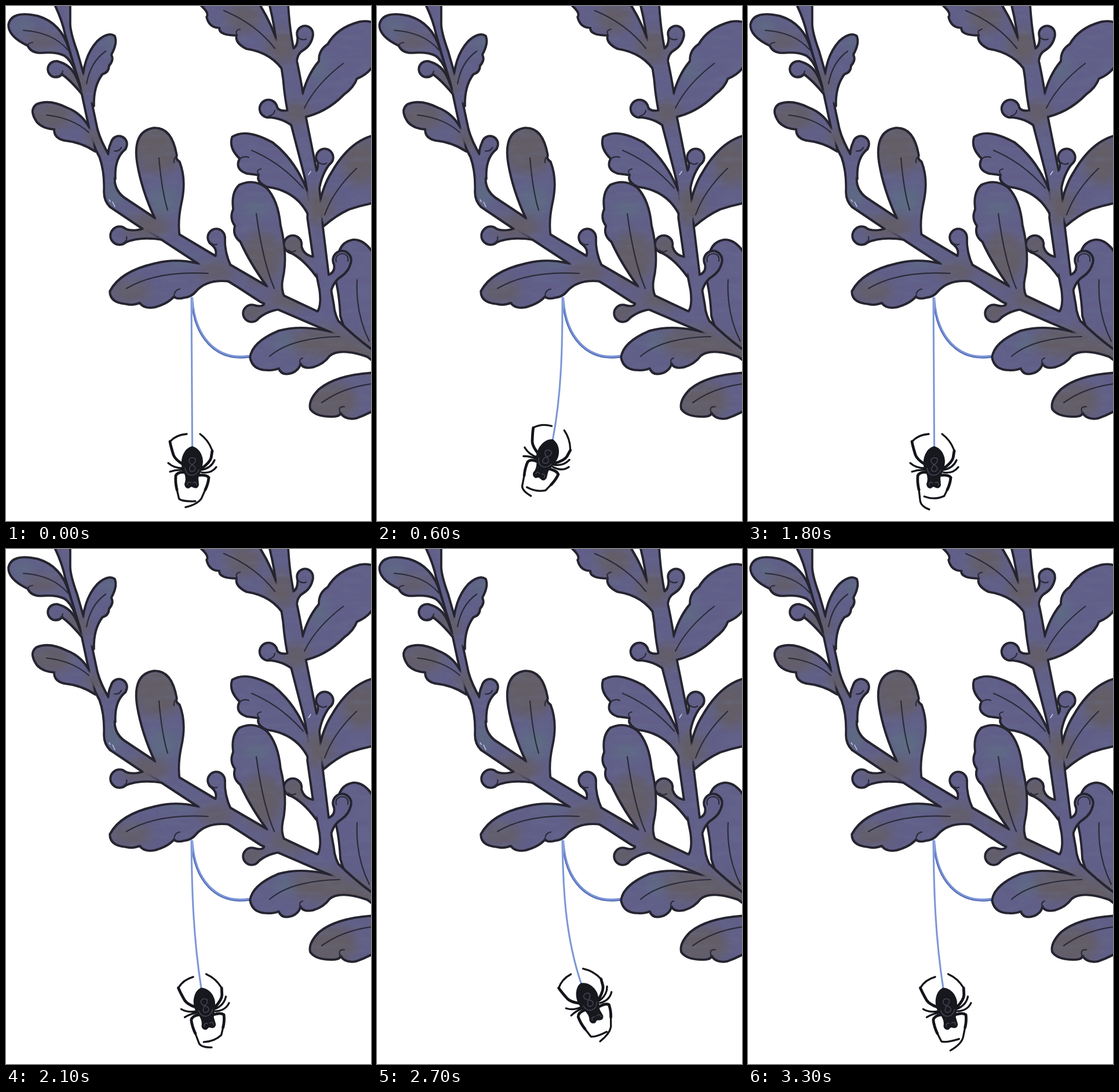
Write an HTML page that moves like this. It is 630 px wide and 888 px high and loops after 3600 ms.

```html
<!DOCTYPE html>
<html lang="en">
<head>
<meta charset="utf-8">
<title>Swinging spider</title>
<style>
  html, body { margin: 0; width: 100%; height: 100%; overflow: hidden; background: #fff; }
  svg { display: block; width: 100%; height: 100%; }
  path { stroke-linecap: round; stroke-linejoin: round; }
  .edge { fill: #25242f; stroke: #25242f; stroke-width: 5.5; }
  .paint { fill: url(#paint); }
  .veins { fill: none; stroke: #2b2a38; stroke-width: 2.2; }
  .silk { fill: none; stroke: #a6bbea; stroke-width: 3.6; }
  .silk-core { fill: none; stroke: #6880c4; stroke-width: 1.3; }
  .leg { fill: none; stroke: #14151b; stroke-width: 4.8; }
  .thin { stroke-width: 3.3; }
  .body { fill: #17181e; }
  .mark { fill: none; stroke: #41444f; stroke-width: 1.6; }
</style>
</head>
<body>
<svg viewBox="0 0 630 888">
  <defs>
    <filter id="soft" x="-60%" y="-60%" width="220%" height="220%"><feGaussianBlur stdDeviation="10"/></filter>
    <filter id="inset" filterUnits="userSpaceOnUse" x="-20" y="-20" width="670" height="928" color-interpolation-filters="sRGB">
      <feMorphology operator="erode" radius="1"/>
    </filter>
    <filter id="brush" x="0" y="0" width="100%" height="100%" color-interpolation-filters="sRGB">
      <feTurbulence type="fractalNoise" baseFrequency=".03 .1" numOctaves="3" seed="4"/>
      <feColorMatrix values="0 0 0 0 .41  0 0 0 0 .46  0 0 0 0 .58  1.6 0 0 0 -.66"/>
    </filter>
    <pattern id="paint" width="630" height="888" patternUnits="userSpaceOnUse">
      <rect width="630" height="888" fill="#615f89"/>
      <g id="blotches" filter="url(#soft)"></g>
      <rect width="630" height="888" filter="url(#brush)" opacity=".4"/>
    </pattern>
  </defs>

  <path class="silk" d="M321 504C325 570 362 612 419 604" style="stroke:#7892d5;stroke-width:4.4"/>
  <path class="silk-core" d="M320 504C323 572 362 614 419 606" style="stroke:#465fa8"/>
  <path class="silk" id="silk"/>
  <path class="silk-core" id="silkCore"/>
  <g id="plant"></g>

  <g id="spider">
    <path class="leg" d="M305 790Q292 782 289 774Q284 758 283 751M338 797Q352 787 354 779L356 767"/>
    <path class="leg thin" d="M283 751Q294 739 312 738M356 767Q350 749 335 738"/>
    <path class="leg thin" d="M305 797Q290 797 280 788M306 800Q294 799 283 803M337 800Q354 797 360 783M337 804Q354 807 363 795"/>
    <path class="leg" d="M308 804Q296 803 293 810Q292 822 295 834M334 809Q346 808 350 813Q349 824 344 834"/>
    <path class="leg thin" id="feet"/>
    <path class="body" d="M321 759C334 762 340 775 340 786C339 798 334 807 332 814L333 826Q331 833 325 831L320 829L315 832Q308 831 308 824Q312 815 307 804C302 796 302 786 304 778Q309 762 321 759Z"/>
    <path class="mark" d="M316 782Q320 776 327 781Q328 787 321 791Q314 798 318 802Q325 804 327 798Q326 793 321 791Q315 787 316 782M309 797Q311 808 319 809Q328 810 333 800M313 825Q313 819 319 822M323 822Q329 819 329 826"/>
  </g>
</svg>
<script>
const byId = id => document.getElementById(id);
const bud = (x, y, r, neck) => [`M${x - r} ${y}a${r} ${r} 0 1 1 ${2 * r} 0a${r} ${r} 0 1 1 ${-2 * r} 0Z`, neck + 'Z'];

const backLeaf = ['M574 450Q570 409 598 404Q618 402 634 428V606Q590 582 578 535Q576 495 569 470Z'];
const backVein = 'M606 472Q603 530 627 578';

const stems = [
  'M84 -4Q98 25 103 50L113 85L128 135L143 205Q150 240 162 260Q171 285 170 318Q169 335 180 346L235 383L262 398L340 449Q375 468 400 484L440 510L540 553L580 570L634 612V595Q600 570 575 545L475 498L382 444L300 395L210 335Q184 320 187 292L185 270Q164 238 157 212L147 165L122 78Q110 45 110 30V-4Z',
  'M455 -4Q465 35 468 72Q478 105 481 145Q486 185 493 205L515 290Q524 325 521 365L531 435L542 490Q546 520 536 530L580 555Q566 535 565 515L557 470L546 380Q543 330 537 292L517 192Q513 150 502 98Q490 60 486 -4Z'
];

const leaves = [
  'M108 75Q95 30 55 18Q10 8 5 32Q4 52 38 68Q44 81 62 80Q87 78 101 85Q112 92 120 112Z',
  'M132 140Q133 88 158 61Q176 45 187 52Q192 64 181 84Q186 93 177 103Q177 114 166 117Q150 138 151 172Z',
  'M146 215Q132 186 105 176Q75 161 53 170Q40 180 54 200Q64 211 84 212Q83 227 100 231Q130 234 154 250Z',
  'M266 383Q236 325 227 270Q219 216 255 211Q286 209 294 258Q291 263 299 269Q311 300 302 340Q295 372 299 398Z',
  'M368 457Q310 432 260 444Q198 457 180 492Q180 511 207 513Q220 516 231 511Q239 523 259 518Q280 512 290 500Q294 506 308 502Q320 501 328 491Q347 470 385 474Z',
  'M462 498Q425 450 405 406Q391 395 396 379Q386 366 393 350Q389 322 403 309Q428 298 449 314Q469 335 473 378Q486 430 477 470Q473 487 480 502Z',
  'M585 570Q520 547 470 561Q425 580 422 606Q426 627 450 627Q462 628 471 624Q476 638 494 632Q506 627 508 615Q513 626 530 622Q548 617 558 603Q578 586 634 608V600Z',
  'M634 633Q570 637 541 661Q522 680 526 695Q536 709 568 707Q577 706 577 700Q585 714 605 710Q619 705 634 697Z',
  'M634 224Q592 235 562 288Q548 310 541 345L548 379Q570 360 592 350Q613 343 634 339Z',
  'M520 320Q498 265 460 236Q415 211 391 226Q385 245 404 263Q395 281 415 288Q432 290 437 291Q432 303 450 311Q506 318 526 368Z',
  'M334 -4Q353 12 347 19Q351 37 369 37Q367 50 399 50Q395 63 415 73Q461 80 482 116L472 75Q458 30 436 -4Z',
  'M507 178Q515 125 541 95Q540 76 556 66Q572 38 610 28Q625 25 634 30V101Q625 117 605 125Q600 140 583 152Q552 184 510 192Z'
];

const buds = [
  bud(86, 109, 13, 'M88 96Q112 101 122 126L132 152Q112 128 98 118'),
  bud(195, 238, 13, 'M186 229Q174 245 178 272L188 298Q186 262 206 246'),
  bud(196, 396, 15, 'M200 382Q216 392 238 384L268 402Q230 396 206 407'),
  bud(363, 399, 14, 'M352 408Q371 422 358 438L388 450Q376 425 377 399'),
  bud(495, 411, 14.5, 'M508 404Q508 432 536 434V466Q514 436 492 425'),
  bud(424, 530, 14, 'M429 517Q449 522 447 506L484 521Q452 522 432 541'),
  bud(550, 261, 14, 'M539 269Q541 285 527 294L539 322Q543 288 563 266'),
  bud(453, 177, 14.5, 'M463 167Q469 186 488 180L498 209Q478 192 452 191'),
  bud(516, 48, 13, 'M504 53Q505 75 488 76L501 103Q500 83 512 76Q526 68 529 51'),
  bud(580, 438, 15, 'M567 446Q570 461 552 466L558 502Q562 476 578 466Q592 456 594 443')
].flat();

const veins = [
  'M30 42Q80 45 107 76M37 69Q39 63 46 63', 'M172 78Q146 96 139 134', 'M70 188Q115 193 143 218',
  'M264 262Q269 320 279 352M294 259Q289 263 290 270', 'M208 487Q260 456 349 461M290 500Q291 489 300 488',
  'M432 358Q443 440 463 487', 'M455 604Q492 572 576 570M508 617Q505 609 512 607', 'M545 684Q580 658 634 651M577 702Q572 690 584 691',
  'M605 280Q565 318 550 360', 'M424 249Q474 270 513 314M404 263Q411 258 419 261M437 291Q430 283 440 281',
  'M376 8Q430 30 464 73M399 50Q394 42 404 40', 'M582 99Q535 135 515 176',
  'M86 121Q96 121 98 112', 'M187 250Q196 251 199 244', 'M202 409Q210 405 208 398', 'M353 408Q359 413 364 411',
  'M488 421Q492 426 500 422', 'M540 270Q547 275 553 271', 'M453 190Q463 188 464 180', 'M505 55Q512 60 518 57',
  'M570 441Q567 429 580 427Q592 428 590 440'
].join('');

function paintLayer(shapes, lines) {
  const draw = cls => shapes.map(d => `<path class="${cls}" d="${d}"/>`).join('');
  return `${draw('edge')}<g filter="url(#inset)">${draw('paint')}</g><path class="veins" d="${lines}"/>`;
}

byId('plant').innerHTML =
  paintLayer(backLeaf, backVein) +
  paintLayer([...stems, ...leaves, ...buds], veins) +
  '<path d="M178 334l2 3M184 338l4 8M522 291l4 -6" fill="none" stroke="#c5cceb" stroke-width="1.4"/>';

const grey = '#645d66', teal = '#5d6c82';
const spots = [
  [grey, 78, 190, 38, 22], [grey, 260, 245, 44, 44], [grey, 122, 132, 22, 22], [grey, 160, 230, 22, 20],
  [grey, 240, 380, 42, 20], [grey, 215, 492, 34, 18], [grey, 440, 435, 34, 45], [grey, 500, 418, 24, 24],
  [grey, 475, 70, 26, 30], [grey, 500, 185, 24, 20], [grey, 612, 268, 32, 40], [grey, 540, 345, 24, 32],
  [grey, 545, 580, 55, 26], [grey, 560, 682, 46, 32], [grey, 610, 600, 34, 28], [grey, 362, 458, 30, 16],
  [grey, 425, 528, 26, 18], [grey, 410, 20, 30, 25], [grey, 62, 60, 30, 14], [grey, 490, 505, 34, 18],
  [teal, 185, 325, 16, 20], [teal, 272, 335, 24, 24], [teal, 28, 34, 18, 12], [teal, 182, 65, 12, 18],
  [teal, 540, 112, 14, 18], [teal, 430, 350, 24, 12], [teal, 480, 580, 20, 12], [teal, 300, 440, 24, 10]
];
byId('blotches').innerHTML = spots.map(([color, x, y, rx, ry]) =>
  `<ellipse cx="${x}" cy="${y}" rx="${rx}" ry="${ry}" fill="${color}"/>`).join('');

const STEP = 300, STEPS = 12;

function pose(step) {
  const swing = -Math.sin(step * Math.PI / 6);
  const dx = swing * (swing < 0 ? 21 : 31);
  const dy = -swing * swing * (swing < 0 ? 16 : 10.5);
  const angle = -swing * (swing < 0 ? 22 : 24.5);
  byId('spider').setAttribute('transform', `translate(${dx} ${dy}) rotate(${angle} 321 760)`);

  const thread = `M320 503C${320.5 + dx * .02} 590 ${321 + dx * .15} 670 ${321.5 + dx} ${760 + dy}`;
  byId('silk').setAttribute('d', thread);
  byId('silkCore').setAttribute('d', thread);

  // The front feet take turns reaching in and out.
  const reach = Math.cos((step + 1.5) * Math.PI / 6);
  const left = `M295 834L${298 + reach} ${852 - 3 * reach}Q${302 + 4 * reach} ${859 - 6 * reach} ${320 + 10 * reach} ${861 - 10 * reach}`;
  const right = `M344 834L${338 - reach} ${847 + 3 * reach}Q${326 + 6 * reach} ${856 + 5 * reach} ${307 + 4 * reach} ${855 + 13 * reach}`;
  byId('feet').setAttribute('d', left + right);
}

const start = performance.now();
let shown = -1;
function tick() {
  const step = Math.floor((performance.now() - start) / STEP) % STEPS;
  if (step !== shown) pose(shown = step);
  requestAnimationFrame(tick);
}
tick();
</script>
</body>
</html>
```
